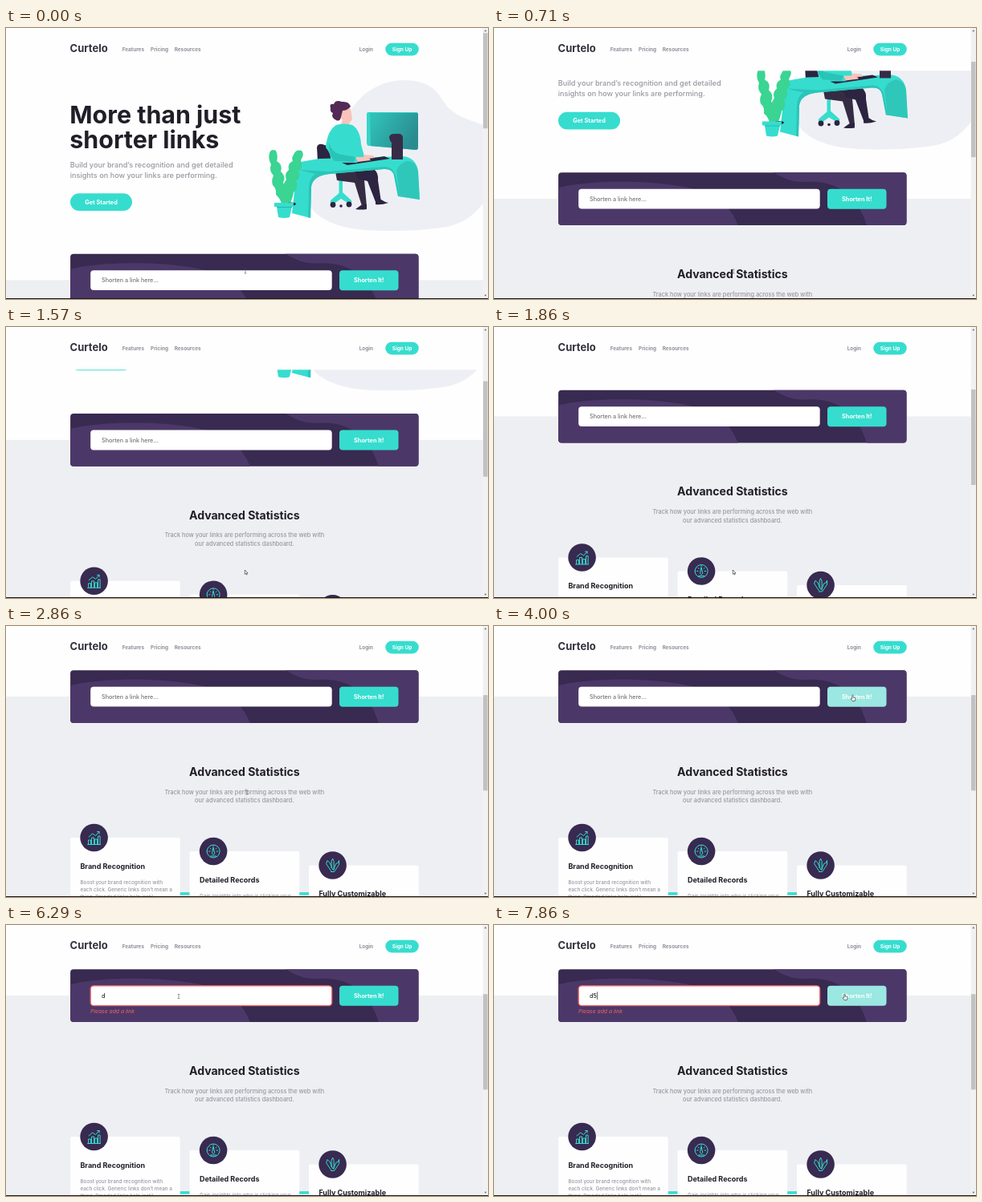
An HTML page for the animation above (8 s loop, 600 by 338 pixels).

```html
<!DOCTYPE html>
<html lang="en">
<head>
<meta charset="utf-8">
<title>Link shortener page</title>
<style>
  html, body { margin: 0; width: 100%; height: 100%; overflow: hidden; background: #fff; }
  svg { display: block; width: 100vw; height: 100vh; }
  text { font-family: Inter, "Open Sans", sans-serif; }
  .bold { font-weight: 700; fill: #211e28; }
  .nav { font-size: 6.4px; font-weight: 700; fill: #918e99; }
  .btn { font-size: 7.3px; font-weight: 700; fill: #fff; text-anchor: middle; }
  .lead { font-size: 9.15px; font-weight: 500; fill: #9896a1; }
  .note { font-size: 7.35px; font-weight: 500; fill: #9896a1; text-anchor: middle; }
  .title { font-size: 9px; }
  .body { font-size: 6.35px; font-weight: 500; fill: #9896a1; }
  .teal { fill: #36ddce; }
  .ink { fill: #2c2440; }
  .skin { fill: #f8c3ba; }
  .icon { fill: none; stroke: #36ddce; stroke-width: 1; stroke-linejoin: round; stroke-linecap: round; }
</style>
</head>
<body>
<svg viewBox="0 0 600 338" preserveAspectRatio="none">
  <defs>
    <linearGradient id="screen" x1="0" y1="0" x2="1" y2="0.5">
      <stop offset="0" stop-color="#30c6bc"/><stop offset="1" stop-color="#2b8c90"/>
    </linearGradient>
    <clipPath id="panel"><rect x="80.1" y="281.8" width="433.4" height="65.7" rx="4"/></clipPath>
  </defs>
  <rect width="600" height="338" fill="#fefefe"/>

  <g id="page">
    <rect y="314.5" width="594" height="400" fill="#eeeff3"/>

    <!-- hero picture -->
    <path fill="#eeeff4" d="M434 96C447 78 470 65 497 65C526 66 535 76 545 92C557 111 577 114 600 123V211C588 226 576 243 548 248C520 253 480 254 448 252C415 250 384 238 377 218C370 194 384 168 396 148C406 126 420 115 434 96Z"/>
    <path class="ink" d="M387 149Q388 144 394 145L402 148L405 168L388 166Z"/>
    <path class="teal" d="M414.500 182H419V205L430 215Q431 219 427 219L417 213L407 220Q403 219 404 215L414.500 206Z"/>
    <g class="ink"><circle cx="407" cy="220.500" r="3.400"/><circle cx="427" cy="220" r="3.400"/><circle cx="417" cy="222" r="1.800"/></g>
    <path fill="#352c44" d="M409 174L440 175Q447 180 446 190L449 222H443L434 193L412 190Z"/>
    <path class="ink" d="M433 175L458 176Q464 181 463 190L467 217H460L450 191L438 188Z"/>
    <path class="ink" d="M442 221L449 220L449 226Q442 227 435 226ZM460 215L467 214Q471 217 476 218Q467 221 460 220Z"/>
    <path class="teal" d="M361 174Q362 167 372 166L390 163L495 160Q510 162 513 178L515 214L488 210L483 184Q481 175 470 176L403 182Q382 184 380 198L379 237L356 231L361 186Z"/>
    <path fill="#2bc5b9" d="M364 177L403 179L470 173Q481 172 485 184L490 210L488 210L483 184Q481 175 470 176L403 182Q382 184 380 198L379 237L376 236L377 198Q378 186 385 182Z"/>
    <path fill="#2bb9ae" opacity=".6" d="M486 178Q490 168 500 166Q511 167 513 180L515 214L490 210Z"/>

    <path fill="#36d5c9" d="M451 105H511Q513 105 513 108V149Q513 152 510 152L452 147Q449 147 449 143V108Q449 105 451 105Z"/>
    <path fill="url(#screen)" d="M453 106H512Q513 106 513 108V149Q513 152 510 152L454 147Z"/>
    <path fill="#372c48" d="M477 136Q478 132 483 132H490Q494 133 494 137V164H480V143Q477 140 477 136Z"/>
    <path class="ink" d="M418 168L471 160L478 163L425 171Z"/>

    <path class="skin" d="M419 114L427 112L428 125L416 125Z"/>
    <path class="teal" d="M411 121Q421 118 431 121Q441 127 442 145L446 160L437 168L405 168Q405 157 398 149Q400 128 411 121Z"/>
    <path fill="#29c4b8" d="M402 143Q405 154 414 157L435 161L433 167L409 166Q401 159 402 143Z"/>
    <path class="skin" d="M435 161H451L454 165L438 167ZM445 158L457 159L459 162L446 163Z"/>
    <path class="skin" d="M416 101Q423 96 429 101L431 113Q429 120 422 118Q415 114 416 101Z"/>
    <path fill="#532a55" d="M404 100Q402 94 408 95Q410 89 418 92Q427 91 429 98Q425 103 419 103L417 111Q416 117 411 115Q404 112 407 106Q403 105 404 100Z"/>

    <g fill="#3ad493">
      <path d="M328 156Q330 150 336 153Q339 160 337 166Q345 170 342 179Q349 185 345 193Q350 200 347 219H343Q341 212 336 208Q337 200 332 196Q330 190 333 184Q327 178 330 170Q326 163 328 156Z"/>
      <path d="M358 158Q361 151 368 153Q372 157 367 165Q371 174 364 178Q368 186 361 191Q365 200 358 205Q356 215 353 220H347Q343 208 348 203Q343 196 349 189Q346 182 352 177Q350 169 357 166Q355 162 358 158Z"/>
    </g>
    <ellipse class="ink" cx="355" cy="219.500" rx="6" ry="2"/>
    <path class="teal" d="M334 218H358V223H356L353 236Q347 238 339 236L337 223H334Z"/>
    <path d="M337 223.500H356" stroke="#25b8ad"/>

    <!-- hero copy -->
    <g class="bold" font-size="30.400">
      <text x="79.300" y="118.900">More than just</text>
      <text x="79.300" y="150.400">shorter links</text>
    </g>
    <text class="lead" x="79.700" y="173.600">Build your brand’s recognition and get detailed</text>
    <text class="lead" x="79.700" y="186.800">insights on how your links are performing.</text>
    <rect class="teal" x="80" y="206.200" width="77" height="21.800" rx="10.900"/>
    <text class="btn" x="118.500" y="219.800">Get Started</text>

    <!-- shorten form -->
    <g clip-path="url(#panel)">
      <rect x="80" y="281" width="434" height="67" fill="#382a50"/>
      <path fill="#4b3868" d="M80 301C110 292 180 291 220 297C275 304 294 322 304 348H80ZM347 281C361 289 370 294 388 293.500C410 292 427 297 440 309C454 321 460 335 464 348H514V281Z"/>
    </g>
    <rect id="field" x="105.200" y="302.300" width="300.500" height="24.800" rx="4" fill="#fff" stroke-width="1.300"/>
    <text id="entry" x="119" y="317.300" font-size="7.200" font-weight="500"></text>
    <path id="caret" d="M128.600 309.700V319.500" stroke="#222" stroke-width=".7"/>
    <text id="error" x="105" y="336.500" font-size="6.800" font-style="italic" fill="#f46262">Please add a link</text>
    <rect id="send" x="415" y="302.200" width="73.500" height="25" rx="4"/>
    <text class="btn" x="451.800" y="317.300">Shorten It!</text>

    <!-- statistics -->
    <text class="bold" x="296.800" y="413.400" font-size="14.050" text-anchor="middle">Advanced Statistics</text>
    <text class="note" x="296.800" y="436.200">Track how your links are performing across the web with</text>
    <text class="note" x="296.800" y="446.900">our advanced statistics dashboard.</text>
    <rect class="teal" x="200" y="558.600" width="190" height="3.500"/>
    <g id="cards"></g>
  </g>

  <!-- fixed header -->
  <rect width="594" height="53.300" fill="#fefefe"/>
  <text x="79.600" y="30.300" font-size="13" font-weight="700" fill="#35313e">Curtelo</text>
  <g class="nav">
    <text x="144.700" y="29.200">Features</text>
    <text x="180" y="29.200">Pricing</text>
    <text x="209.700" y="29.200">Resources</text>
    <text x="439.700" y="29.200">Login</text>
  </g>
  <rect class="teal" x="472.300" y="18.800" width="41.500" height="15.600" rx="7.800"/>
  <text class="btn" x="493" y="29.100" style="font-size:6.500px">Sign Up</text>

  <!-- scrollbar -->
  <rect x="593.500" width="6.500" height="338" fill="#f1f1f1"/>
  <rect id="thumb" x="594" width="5.500" height="119" fill="#c1c1c1"/>
  <path d="M595.300 4.300L596.800 2.300L598.300 4.300ZM595.300 332.700L596.800 334.700L598.300 332.700Z" fill="#666"/>
  <rect y="337" width="600" height="1" fill="#17171a"/>

  <g id="cursor" stroke-linejoin="round">
    <path data-kind="beam" d="M-1.300 -2.500H1.300M0 -2.500V2.500M-1.300 2.500H1.300" fill="none" stroke="#555" stroke-width=".6"/>
    <path data-kind="arrow" d="M0 -3V2.300L1.200 1.300L2 3L2.900 2.600L2.100 1H3.700Z" fill="#fff" stroke="#222" stroke-width=".6"/>
    <path data-kind="hand" d="M-1.200 -3.500Q-.5 -4.300 0 -3.500V-1L2.600 -.4Q3.200 0 3 1L2.200 3.600H-1L-3 .8Q-2.800 -.3 -1.200 .8Z" fill="#fff" stroke="#222" stroke-width=".6"/>
  </g>
</svg>

<script>
const $ = id => document.getElementById(id);
const LOOP = 8000;

// x, top, title, body lines, icon path around the badge centre
const cards = [
  [80, 490.5, 'Brand Recognition',
    ['Boost your brand recognition with', 'each click. Generic links don’t mean a', 'thing. Branded links help instil'],
    'M-8 8.500H8M-7 8V3H-4V8M-3 8V0H0V8M1 8V2H4V8M5 8V-2H7.500V8M-6.500 -1L-2 -5L2 -2.500L6.500 -7.500M4 -7.500H6.500V-5'],
  [228.5, 507.5, 'Detailed Records',
    ['Gain insights into who is clicking your'],
    'M-8 0A8 8 0 1 1 8 0A8 8 0 1 1 -8 0M0 -4.500L1.500 2A1.600 1.600 0 1 1 -1.500 2ZM-5.500 0H-4M5.500 0H4M-4 -4L-3 -3M4 -4L3 -3M0 -7V-6M-3.500 6H3.500'],
  [377, 525, 'Fully Customizable', [],
    'M-2 7L-8 -2L-6.500 -6L-3.500 -3L0 5M-1.500 3V-5L0 -8.500L1.500 -5V5M1 6L4 -2Q7 -2 8 -6Q9 0 6 2L2 8H-2']
];
$('cards').innerHTML = cards.map(([x, y, title, lines, icon]) =>
  `<rect x="${x}" y="${y}" width="136.700" height="150" rx="2" fill="#fefefe"/>
   <circle cx="${x + 29.6}" cy="${y}" r="17.300" fill="#382a50"/>
   <path class="icon" transform="translate(${x + 29.6} ${y})" d="${icon}"/>
   <text class="bold title" x="${x + 12.4}" y="${y + 38.7}">${title}</text>` +
  lines.map((s, i) => `<text class="body" x="${x + 12.4}" y="${y + 57.7 + i * 9}">${s}</text>`).join('')
).join('');

// [time, value...]
const scrollKeys = [
  [430, 0], [570, 42], [710, 101.5], [860, 135], [1000, 153.5], [1140, 164], [1290, 170], [1430, 173],
  [1570, 173.7], [1710, 182], [1860, 203], [2000, 217], [2140, 224], [2290, 226.5]
];
const mouseKeys = [
  [0, 298, 303.5], [1430, 298, 303.5], [1570, 297.3, 306], [2430, 297.3, 306], [2860, 300, 207.5],
  [3290, 427, 94], [3430, 427, 94], [3710, 447, 90], [5140, 447, 90], [5710, 215, 89],
  [7140, 215, 89], [7710, 437, 90], [8000, 437, 90]
];

function sample(keys, t, col = 1) {
  const i = keys.findIndex(k => k[0] > t);
  if (i === 0) return keys[0][col];
  if (i < 0) return keys[keys.length - 1][col];
  const a = keys[i - 1], b = keys[i];
  return a[col] + (b[col] - a[col]) * (t - a[0]) / (b[0] - a[0]);
}

const tick = k => Math.round(k * 100 / 7) * 10;
function snap(t) {
  const k = Math.floor(t * 7 / 1000 + 0.05);
  return tick(k) > t ? tick(k - 1) : tick(k);
}

function kindAt(t, x, y) {
  if (t < 1430) return 'beam';
  if (t < 2570) return 'arrow';
  const inForm = y > 75 && y < 101;
  if (inForm && x > 415 && x < 489) return 'hand';
  if (inForm && x > 105 && x < 406) return 'beam';
  return y > 200 && y < 225 ? 'beam' : 'arrow';
}

function draw(time) {
  const t = snap(time);
  const scroll = sample(scrollKeys, t);
  $('page').setAttribute('transform', `translate(0 ${-scroll})`);
  $('thumb').setAttribute('y', 6.3 + scroll * 0.353);

  const x = sample(mouseKeys, t), y = sample(mouseKeys, t, 2);
  const kind = kindAt(t, x, y);
  $('cursor').setAttribute('transform', `translate(${x} ${y})`);
  for (const p of $('cursor').children) p.style.display = p.dataset.kind === kind ? '' : 'none';

  const failed = t >= 4140;
  const typed = t < 6290 ? '' : t < 6430 ? 'd' : 'd5';
  const blink = Math.floor((t - (typed ? 6430 : 5860)) / 500) % 2 === 0;
  $('field').setAttribute('stroke', failed ? '#f46262' : 'none');
  $('error').style.display = failed ? '' : 'none';
  $('entry').textContent = typed || 'Shorten a link here...';
  $('entry').setAttribute('fill', typed ? '#222' : failed ? '#ee5656' : '#747378');
  $('caret').style.display = t >= 5860 && blink ? '' : 'none';
  $('caret').setAttribute('transform', `translate(${[-9.6, -4.8, 0][typed.length]} 0)`);
  $('send').setAttribute('fill', kind === 'hand' ? '#9be7e1' : '#36ddce');
}

const start = performance.now();
function loop(now) {
  draw(Math.max(0, now - start) % LOOP);
  requestAnimationFrame(loop);
}
draw(0);
requestAnimationFrame(loop);
</script>
</body>
</html>
```
